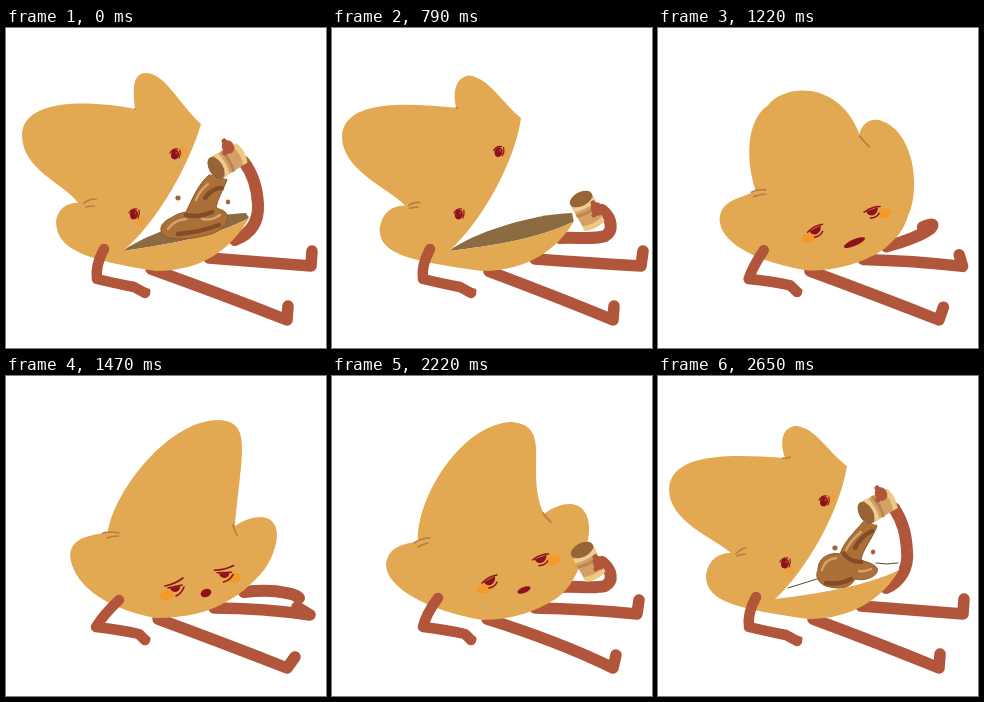
These frames come from a looping animation (320x320 px, 2830 ms). An HTML page:

```html
<!DOCTYPE html>
<html lang="en">
<head>
<meta charset="utf-8">
<title>Cookie snack</title>
<style>
html, body { margin: 0; width: 100%; height: 100%; overflow: hidden; background: #fff; }
svg { display: block; width: 100%; height: 100%; }
</style>
</head>
<body>
<svg id="stage" viewBox="0 0 320 320" fill="none" stroke-linecap="round" stroke-linejoin="round"></svg>
<script>
const LOOP = 2830;
const DOUGH = '#e3a952', LIMB = '#b1553b', RED = '#8e1120', BLUSH = '#f39a2b', CREASE = '#bd7a42';

// Blend two strings number by number.
const blend = (a, b, t) => {
  const nums = b.match(/-?[\d.]+/g);
  let i = 0;
  return a.replace(/-?[\d.]+/g, n => +(+n + (nums[i++] - n) * t).toFixed(2));
};
const mix = (a, b, t, extra) => {
  const out = {};
  for (const k of Object.keys(a)) {
    out[k] = a[k] && b[k] && k !== 'look' && k !== 'inside'
      ? blend(a[k], b[k], t)
      : (t < 0.5 ? a[k] : b[k]);
  }
  return { ...out, ...extra };
};

const pour = {
  body: 'M72 175C58 155 16 142 16 107C17 70 85 72 129 81C127 62 126 45 140 45C160 46 172 75 195 96C184 135 151 195 117 223C160 217 210 208 243 190C225 222 195 243 150 243C80 232 50 222 50 193C52 180 62 174 72 175',
  gape: 'M117 223C140 205 200 186 240 185',
  arm: 'M229 212C244 206 253 195 252 176C251 158 247 146 238 134',
  fore: 'M98 221Q89 238 91 251Q112 256 128 259L139 265',
  legA: 'M145 241Q215 266 281 292L282 278',
  legB: 'M203 230Q255 234 305 238L306 223',
  crease: 'M78 175Q83 171 90 171M80 179Q84 178 88 178M129 81Q129 81 129 81',
  face: '128 186 169 126 134 193 176 123',
  lips: '150 215 0 0 -20',
  bottle: '210 140 -30', hand: '222 119',
  sauce: 'M203 147C192 156 186 172 180 184C174 185 169 187 165 190C156 194 153 200 156 205C160 214 185 212 205 206C215 203 224 194 221 187C219 181 212 182 210 179C212 170 218 160 221 152Z',
  shine: 'M190 172Q194 162 202 156M162 201Q168 192 180 191M196 191Q206 193 214 187',
  shade: 'M199 170Q206 160 216 160M172 206Q195 204 213 197M180 187Q192 190 206 184',
  drops: '172 170 222 174',
  look: 'wide', inside: '#8a6b42'
};
const heap = {
  ...pour,
  body: 'M73 177C55 158 11 142 11 108C13 70 80 75 125 80C121 62 125 48 138 47C158 50 170 74 190 91C183 135 149 195 117 223C160 218 208 210 242 193C225 222 195 243 150 243C80 233 48 226 48 200C50 184 60 177 73 177',
  arm: 'M229 212C246 206 256 192 254 175C252 158 247 146 238 135',
  legA: 'M155 243Q225 269 281 292L282 278',
  crease: 'M77 177Q82 173 88 174M78 180Q82 179 86 179M125 80Q125 80 126 80',
  face: '127 186 167 124 131 188 171 124',
  bottle: '208 144 -30', hand: '219 124',
  sauce: 'M210 150C204 160 198 166 188 168C176 172 172 180 173 189C160 192 148 202 152 208C160 214 178 210 190 208C205 203 222 195 222 184C221 177 212 178 206 178C214 168 218 162 221 152Z',
  shine: 'M177 186Q181 176 191 172M158 205Q166 197 178 195M192 190Q205 190 214 183',
  shade: 'M199 168Q206 159 218 156M166 208Q184 202 202 201M182 189Q192 182 204 181',
  drops: '163 177 220 171'
};
const first = {
  ...heap,
  body: 'M73 177C55 161 11 146 11 113C13 76 74 78 127 82C121 64 125 51 138 50C158 52 168 74 189 90C182 135 148 195 117 223C160 218 208 210 241 194C225 222 195 243 150 243C80 233 48 226 48 200C50 184 60 177 73 177',
  arm: 'M228 212C242 206 251 192 249 175C248 158 245 146 236 132',
  crease: 'M78 178Q82 173 88 172M79 180Q82 179 87 178M125 82Q128 83 132 81',
  face: '127 187 166 125 132 194 173 122',
  bottle: '208 137 -29', hand: '223 118',
  sauce: 'M205 146C197 156 187 164 182 178C174 176 160 180 160 194C156 202 163 210 172 211C185 214 194 210 197 203C210 206 222 198 219 192C215 187 208 186 203 184C204 174 215 162 219 150Z',
  shine: 'M188 174Q193 164 203 156M164 194Q167 183 178 182M201 195Q207 196 213 193',
  shade: 'M197 172Q203 160 214 155M168 207Q182 209 193 203M186 178Q192 186 203 186',
  drops: '177 172 215 176',
  inside: '#fff'
};
const sulk = {
  ...pour,
  body: 'M95 168C75 140 40 125 41 100C45 62 145 37 183 77C180 67 185 58 195 59C218 64 234 88 242 115C250 138 253 162 250 178C247 196 240 207 230 217C210 233 180 243 150 243C90 233 60 218 60 200C60 180 78 178 95 168',
  gape: 'M250 178C247 190 240 207 230 217',
  arm: 'M222 220C240 214 262 202 267 190C271 180 262 179 246 184',
  fore: 'M101 221Q93 238 91 251Q115 253 132 257L139 264',
  legA: 'M152 243Q220 268 281 292L283 278',
  legB: 'M203 231Q255 233 305 238L308 224',
  crease: 'M91 169Q97 165 104 165M92 173Q98 171 105 170M185 81Q191 86 198 92',
  face: '150 194 212 172 144 204 225 174',
  lips: '194 213 15.5 2.8 -25',
  bottle: '', hand: '', sauce: '', look: 'sad'
};
const sigh = {
  ...sulk,
  body: 'M102 156C106 120 160 44 213 44C246 46 236 74 229 150C238 144 246 141 256 141C266 142 271 149 271 160C270 175 262 192 250 203C242 211 234 218 225 223C205 236 180 242 150 242C95 232 65 205 64 178C67 160 85 160 102 156',
  gape: 'M250 203C242 211 234 218 225 223',
  arm: 'M238 216C255 214 268 214 280 217C287 218 291 220 293 222',
  fore: 'M113 224Q98 238 90 251Q115 254 133 258L139 264',
  legA: 'M152 243Q220 268 281 292L289 281',
  legB: 'M208 232Q255 232 304 239L291 231',
  crease: 'M97 157Q104 155 113 157M101 162Q106 160 112 160M227 149Q228 154 231 159',
  face: '169 212 218 198 161 219 228 202',
  lips: '200 217 5.5 4 -20', look: 'tired'
};
const slump = {
  ...sigh,
  body: 'M104 160C112 118 168 55 220 53C268 55 232 90 231 152C240 147 250 147 258 147C270 148 275 153 275 161C271 177 262 192 250 202C243 210 234 217 225 222C205 235 180 244 150 244C95 234 61 208 61 184C63 166 85 164 104 160',
  arm: 'M232 215C245 214 252 217 258 218C263 218 268 218 271 219',
  legA: 'M155 244Q230 260 278 289L288 281',
  legB: 'M210 231Q262 229 303 238L302 227',
  crease: 'M97 161Q105 158 115 159M103 165Q108 162 110 162M229 152Q230 158 232 163',
  face: '170 218 219 203 160 225 231 205',
  lips: '202 221 4.3 2.6 -15', look: 'shut'
};
const wake = {
  ...slump,
  body: 'M86 165C84 122 130 47 180 46C222 50 192 95 212 138C221 131 230 128 238 128C252 129 258 140 257 156C255 174 249 190 242 202C238 210 232 217 225 222C205 235 180 244 150 244C95 234 54 212 54 188C57 170 70 169 86 165',
  gape: 'M242 202C238 210 232 217 225 222',
  arm: 'M228 211C245 210 262 213 273 210C282 205 280 194 270 186',
  fore: 'M106 222Q94 238 91 251Q115 254 133 258L139 264',
  legA: 'M155 243Q228 266 281 292L284 279',
  legB: 'M203 232Q255 233 305 238L307 224',
  crease: 'M82 167Q89 162 98 162M86 171Q91 168 96 167M211 137Q214 142 219 146',
  face: '158 204 209 182 152 213 221 184',
  lips: '192 214 7 3 -22',
  bottle: '250 174 63', hand: '267 187', look: 'sad'
};
const grab = {
  ...wake,
  body: 'M78 167C56 128 76 34 137 28C174 26 146 72 184 117C192 98 200 87 210 87C226 88 231 122 234 153C205 164 160 193 148 226C185 226 215 217 238 199C220 230 190 244 155 244C90 234 52 214 52 192C54 180 66 175 78 167',
  gape: 'M148 226C155 202 190 195 236 192',
  arm: 'M228 210C245 209 262 212 273 208C282 203 280 190 270 182',
  fore: 'M104 223Q93 238 91 251Q115 253 132 257L139 264',
  crease: 'M76 168Q80 165 86 163M78 171Q81 170 84 170M184 117Q188 121 193 122',
  face: '155 187 201 160 153 198 212 157',
  lips: '150 215 0 0 -20',
  bottle: '249 171 63', hand: '265 181', look: 'wide'
};

const kick = 'M203 231Q258 235 309 238L311 223';
const steps = [
  [0, pour],
  [180, mix(pour, heap, 0.45)],
  [360, mix(pour, heap, 0.85)],
  [430, heap],
  [610, mix(pour, heap, 1.6, { legB: kick, sauce: heap.sauce, bottle: heap.bottle, hand: heap.hand })],
  [790, mix(pour, heap, 1.2, { legB: kick, sauce: '', arm: grab.arm, bottle: grab.bottle, hand: grab.hand })],
  [970, mix(heap, sulk, 0.55)],
  [1040, sulk],
  [1220, mix(sulk, sigh, 0.4)],
  [1290, mix(sulk, sigh, 0.85)],
  [1470, sigh],
  [1970, slump],
  [2150, mix(slump, wake, 0.5, { bottle: '', hand: '' })],
  [2220, wake],
  [2400, grab],
  [2470, mix(grab, first, 1.15, { sauce: '', inside: pour.inside, legB: kick, arm: first.arm, bottle: first.bottle, hand: first.hand })],
  [2650, first]
];

const line = (d, color, w) => `<path d="${d}" stroke="${color}" stroke-width="${w}"/>`;
const fill = (d, color) => `<path d="${d}" fill="${color}"/>`;
const oval = (x, y, rx, ry, color, rot = 0) =>
  `<ellipse rx="${rx}" ry="${ry}" fill="${color}" transform="translate(${x} ${y}) rotate(${rot})"/>`;
const at = (x, y, rot, inner) => `<g transform="translate(${x} ${y}) rotate(${rot})">${inner}</g>`;
const list = s => s.split(' ').map(Number);

const eyes = {
  wide: oval(0, 0.5, 4, 5, RED, 15) + line('M-5 -1Q-2 -6 3 -5M5 -4Q6 0 4 4', RED, 1.2) + oval(1.5, -1, 1, 1.4, '#c4392f'),
  sad: fill('M-6 2Q-4 6 1 5Q6 2 5 -4Z', RED) + line('M-8 3Q-1 -4 7 -5M-1 8Q5 7 7 2', RED, 1.5),
  tired: fill('M-5 0Q-4 4 1 4Q6 2 5 -2Z', RED) + line('M-10 -2Q0 -4 8 -10M-7 0L7 -3M1 8Q7 5 9 -1', RED, 1.6),
  shut: line('M-10 -3Q0 -4 7 -11M-6 1Q1 0 6 -3M-3 4L3 2', RED, 1.8)
};
const tilt = { wide: 0, sad: 8, tired: 10, shut: 20 };

function faceOf(p) {
  const [ax, ay, bx, by, cx, cy, dx, dy] = list(p.face);
  const wide = p.look === 'wide', rx = wide ? 5 : 7.5, ry = wide ? 4.5 : 4.8;
  const blush = wide ? '#eba041' : BLUSH;
  const [mx, my, mw, mh, rot] = list(p.lips);
  return oval(cx, cy, rx, ry, blush, -15) + oval(dx, dy, rx, ry, blush, -15) +
    at(ax, ay, 0, eyes[p.look]) + at(bx, by, tilt[p.look], eyes[p.look]) +
    (mw > 0 ? oval(mx, my, mw, mh, RED, rot) : '');
}

function sauceOf(p) {
  const [ax, ay, bx, by] = list(p.drops);
  return fill(p.sauce, '#ab6f38') + line(p.shade, '#824c27', 4.5) +
    line(p.sauce, '#8f5629', 1) + line(p.shine, '#d6a26c', 2.4) +
    oval(ax, ay, 2.6, 2.4, '#a5603a') + oval(bx, by, 2.2, 2.4, '#a5603a');
}

function bottleOf(p) {
  const [x, y, rot] = list(p.bottle);
  const [hx, hy] = list(p.hand);
  return at(x, y, rot,
    fill('M0 -12L30 -11Q34 0 30 11L0 12Z', '#d3a066') +
    fill('M4 -12L9 -12Q12 0 9 12L4 12Q7 0 4 -12Z', '#efcd92') +
    fill('M25 -11L30 -11Q34 0 30 11L25 11Q29 0 25 -11Z', '#efc982') +
    fill('M12 -12L15 -12Q18 0 15 12L12 12Q15 0 12 -12Z', '#b98650') +
    oval(0, 0, 7, 12, '#966436')) +
    oval(hx, hy, 6, 7, LIMB, -30) +
    line(`M${hx} ${hy}l-4 -6M${hx} ${hy}l-3 6`, LIMB, 5);
}

function draw(p) {
  // Jaw rim is the sixth curve of the body.
  const parts = p.body.split('C');
  const jaw = parts[6].split(' '), hinge = parts[5].split(' ').slice(-2);
  const mouth = `${p.gape}L${jaw[4]} ${jaw[5]}C${jaw[2]} ${jaw[3]} ${jaw[0]} ${jaw[1]} ${hinge.join(' ')}Z`;
  const pale = p.inside === '#fff';
  return line(p.legB, LIMB, 11.5) + line(p.legA, LIMB, 11.5) + line(p.arm, LIMB, 12) +
    fill(mouth, p.inside) +
    (pale ? line('M130 212L162 202M218 187Q229 189 240 187', '#5e4a30', 1) : '') +
    fill(p.body + 'Z', DOUGH) + line(p.crease, CREASE, 1.7) + faceOf(p) +
    (p.sauce ? sauceOf(p) : '') + (p.bottle ? bottleOf(p) : '') +
    line(p.fore, LIMB, 10.5) + line('M132 261L142 263', LIMB, 5);
}

const stage = document.getElementById('stage');
const pictures = steps.map(([, pose]) => draw(pose));
const start = performance.now();
let shown = -1;

function update() {
  const t = (performance.now() - start) % LOOP;
  const i = steps.findLastIndex(([from]) => from <= t);
  if (i !== shown) stage.innerHTML = pictures[shown = i];
  requestAnimationFrame(update);
}
update();
</script>
</body>
</html>
```
